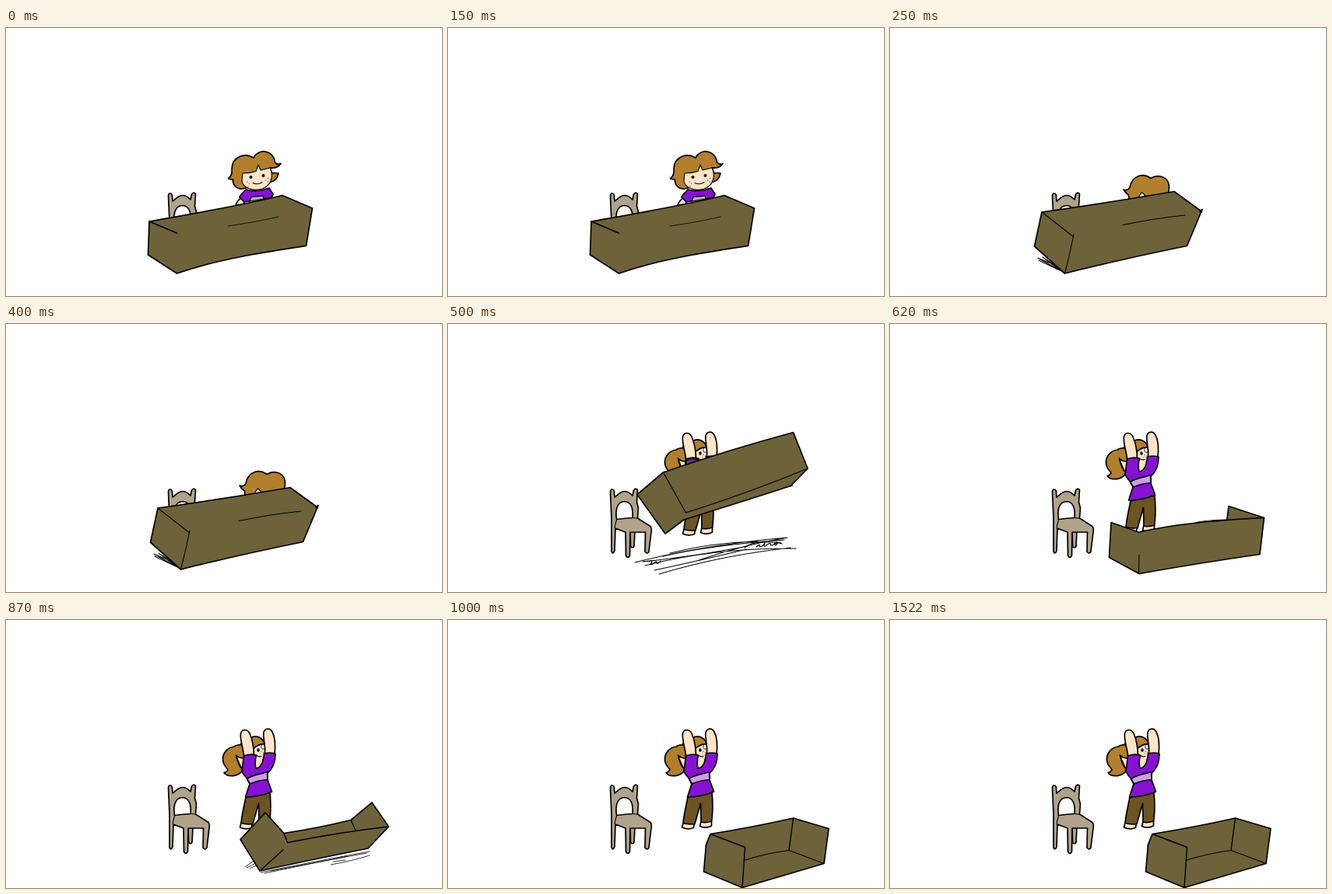
Animation of 560 by 345 pixels, one loop 1.87 s. Source, as an HTML page:

```html
<!DOCTYPE html>
<html lang="en">
<head>
<meta charset="utf-8">
<title>Flipping the desk</title>
<style>
html, body { margin: 0; width: 100%; height: 100%; overflow: hidden; background: #fff; }
svg { display: block; width: 100vw; height: 100vh; }
svg { fill: none; stroke: #000; stroke-width: 1.7; stroke-linecap: round; stroke-linejoin: round; }
.pose { visibility: hidden; }
.pose.on { visibility: visible; }
.wood { fill: #6e623b; }
.chair { fill: #b1a28b; }
.hair { fill: #b17f2d; }
.skin { fill: #fde4ca; }
.top { fill: #8512d0; }
.sash { fill: #cf9ceb; }
.pants { fill: #6c5423; }
.paper { fill: #fff; }
.thin { stroke-width: 1.1; }
.fine { stroke-width: .8; }
.dot { fill: #000; stroke: none; }
.freckle { fill: #6b4a30; stroke: none; }
</style>
</head>
<body>
<svg viewBox="0 0 560 345">
  <defs>
    <g id="chair">
      <path class="chair" d="M234 266 L234.500 286 Q237 290 239 286 L240 267Z"/>
      <path class="chair" d="M208.500 216 Q208.500 212.500 211.500 213 Q214 214 213.500 218 L214 223 C218 220 221 215.500 227 215.500 C232 215.500 234 218 237 221 L238.500 214 Q241 210.500 243.500 213.500 L242.500 229 L244.500 237 L243.500 250 L260 260.500 Q262 263 261 268 L258 293 Q256 297 253 293 L253.500 268 L234 268 L233.500 298 Q231 303 228.500 298 L228 268 L215 263 L214 292 Q212 297 210 293 L210 250Z"/>
      <path class="paper" d="M216.500 251.500 C215 241 216 228.500 227 228.500 C236 229 238 239 237 249.500 Q227 250 216.500 251.500Z"/>
      <path d="M214 262 L216.500 252 M237 249.500 L243.500 250" class="thin"/>
    </g>

    <g id="legs">
      <path class="skin" d="M302 261 L300.500 267 Q308 270.500 315.500 267.500 L316.500 261Z"/>
      <path class="skin" d="M325 259 L323.500 265.500 Q331 269 338.500 265 L338.500 258Z"/>
      <path class="pants" d="M308 228 L339 221 C340.500 238 340 250 338.500 259 Q331 261.500 325 260 L324.500 236 L317 262.500 Q309 263.500 302 261.500 C303 249 306 239 308 228Z"/>
    </g>

    <g id="girl">
      <path class="skin thin" d="M302 158 C313 148 328 150 332 161 C334 169 333 177 330 179 L330 190 L320 192 L304 194 L296 176Z"/>
      <path class="hair" d="M304 161 C298 160 294 162 293 163 C284 164 278 172 278.500 180 C279 188 285 191 285 193 Q283 196 280 196.500 C285 203 299 202 304 193 C299 188 297 181 295.500 174 Q299 178 306 178Z"/>
      <path class="hair" d="M314 152 C321 147 331 152 332 160 C325 159 321 163 317 166Z"/>
      <path class="skin" d="M306 177 C305 166 300 153 301.500 146 C303 140 310 140 313 146 C316 153 318.500 163 318.500 176Z"/>
      <path class="skin" d="M332 174 C334.500 164 329.500 151 331 144.500 C333 139 339 138.500 342 144 C346.500 152 346 164 345 174Z"/>
      <path class="top" d="M305.500 175 Q313 172 321.500 174 Q319 183 321 191 Q330 190 331.500 172 Q339 170 346 172 C346 182 343 191 336 197 L336 206 L341.500 221 Q325 228 307.500 228 L313 211 L309.500 204 Q305 199 303 195Z"/>
      <path class="sash" d="M309.500 204.500 C319 198 327 199 335.500 195.500 L336 205.500 C328 206 320 208 313.500 211Z"/>
      <path class="paper fine" d="M330 160 Q326 162 329 166 Q332 167 332 165"/>
      <ellipse class="dot" cx="324" cy="167.500" rx="1.700" ry="2.200"/>
      <path class="thin" d="M322 174.500 Q325 176.500 328 175.500"/>
      <g class="freckle"><circle cx="328" cy="169.500" r=".7"/><circle cx="330.500" cy="171" r=".7"/><circle cx="327" cy="172" r=".6"/></g>
    </g>
  </defs>

  <use href="#chair"/>

  <!-- sitting -->
  <g class="pose">
    <path class="skin" d="M303 218 Q297 222 295 228 L305 227 L308 219Z"/>
    <path class="hair" d="M318 167 C306 160 290 166 290 182 C291 189 288 192 285.500 194 Q289 195 291.500 195 C291 202 296 207.500 304 207 L341 198 Q348 196 350 187 Q346 186 342 187 L339 180 Q349 181 353 174.500 Q349 177 345.500 173 C343 156 324 155 318 167Z"/>
    <path class="skin thin" d="M304 187 Q313 187 321 184.500 L324 176 L327 183 L339 180 C344 190 341 203 329 207 C316 211 304 205 303 197Z"/>
    <path class="top" d="M308 208 C305 212 301 214 300 218 L306 224 L341 218 L343 214 L338 206 Q323 212 308 208Z"/>
    <path fill="#bda9c8" class="thin" d="M313 223 L315 217.500 Q323 217 330 216 L331 220Z"/>
    <circle class="dot" cx="314.500" cy="192" r="2"/><circle class="dot" cx="330.500" cy="190" r="2"/>
    <path class="thin" d="M317 199.500 Q323 202.500 329 198.500"/>
    <g class="freckle"><circle cx="310" cy="198" r=".7"/><circle cx="312.500" cy="200.500" r=".7"/><circle cx="311" cy="204" r=".7"/><circle cx="333.500" cy="196" r=".7"/><circle cx="336.500" cy="193.500" r=".7"/><circle cx="336.500" cy="198" r=".7"/></g>
    <path class="wood" d="M184 249 C240 239 300 229 355 215.500 L393.500 232 L385.500 280.500 C330 289 270 298 219.500 316 L182.500 292Z"/>
    <path d="M184 249 L219.500 264"/>
    <path class="fine" d="M285 255 Q320 250 350 243"/>
  </g>

  <!-- ducking behind -->
  <g class="pose">
    <path class="hair" d="M300 208 Q306 210 308 205 C311 190 325 186 335 193.500 C345 187 359 192 358.500 206 L357 218 L307 224 L306.500 215 Q303 213 300 208Z"/>
    <path class="skin thin" d="M319 218 L323.500 211.500 L329 217Z"/>
    <path class="thin" d="M190 296 L222 314 M191 299 L218 312 M196 295 L224 315 M192 297 L214 306 M201 298 L224 315 M195 301 L221 313 M205 302 L224 315"/>
    <path class="wood" d="M195 237 Q280 225 365 210.500 L400 236 L381.500 280.500 Q300 297 224.500 316 L185.500 281Z"/>
    <path class="thin" d="M195 237 L236 269 M236 266 Q231 291 224.500 316"/>
    <path d="M398 236 L401 233.500 L400 237"/>
    <path class="thin" d="M299 253.500 Q340 245 379 241"/>
  </g>

  <!-- heaving the desk up -->
  <g class="pose">
    <use href="#legs" x="1" y="3"/>
    <use href="#girl" y="-1"/>
    <path d="M306 176 Q313 172 321 175 L320 182 L305 186Z" fill="#5b348e" class="thin"/>
    <path class="wood" d="M243 219.500 L276.500 191 Q360 162 443.500 139.500 L462 186 L440 208.500 Q380 228 325 245 L303 252 L279 270Z"/>
    <path d="M276.500 191 L305.500 243 Q390 216 462 186" class="thin"/>
    <path d="M290 262 L302 252" class="thin"/>
    <path d="M438 209 L442 208"/>
    <path class="thin" d="M240 307 Q330 284 436 275 M253 311 Q340 288 447 289 M271 322 Q350 298 440 288 M276 299 Q335 285 432 278 M250 306 Q310 300 385 286 M285 295 Q340 281 398 280 M265 317 Q330 303 383 290 M322 304 Q380 284 436 275"/>
    <path class="thin" d="M258 306 q4 -3 4 1 q-5 4 1 2 q5 -5 5 -2 q0 4 5 -2 M381 288 Q388 281 405 281 Q420 280 429 283 M396 287 q6 -5 4 -1 q3 2 7 -4 q-3 6 2 3 q6 -5 5 -1 q3 2 5 -1 q5 -5 4 0 q-4 4 -3 0 q4 -3 8 -1"/>
  </g>

  <!-- desk turned over -->
  <g class="pose">
    <use href="#legs" x="1"/>
    <use href="#girl" x="-1" y="-1"/>
    <path class="wood" d="M435 234.500 L480.500 249.500 L474 270 L432 258Z"/>
    <path class="wood" d="M284 255.500 L319.500 268 Q355 260 394 256 Q438 251 480.500 249.500 L475 296.500 Q395 308 320 321.500 L281.500 300.500Z"/>
    <path class="thin" d="M320 297 L319.500 321 M393 255.500 Q410 252 432 252"/>
  </g>

  <!-- desk rolling -->
  <g class="pose">
    <use href="#legs"/>
    <use href="#girl"/>
    <path class="fine" d="M307 318 L317 311 M309 319 L319 314 M313 320 L321 316 M327 325 Q400 310 467 298 M332 326 L439 304 M340 323 L463 300 M417 315 Q445 310 467 303 M420 311 L436 309"/>
    <path class="wood" d="M301 282.500 L333 248 L357 274.500 Q400 268 443 257.500 L470 235 L491.500 266 L465 294 Q395 308 326 323Z"/>
    <path d="M357 274.500 L361.500 286.500 Q430 273 491.500 266" stroke-width="1.400"/>
    <path class="thin" d="M443 257.500 L449 271 M356.500 295.500 L326 323"/>
  </g>

  <!-- desk at rest -->
  <g class="pose">
    <use href="#legs"/>
    <use href="#girl"/>
    <path class="wood" d="M337 275.500 Q390 267 443.500 255 L489 268.500 L483 313.500 Q430 329 378 344.500 L328.500 324 L331.500 289Z"/>
    <path d="M337 275.500 L381.500 292.500 L378 344.500 M443.500 255 L438 296" stroke-width="1.400"/>
    <path class="thin" d="M380 309.500 Q410 300 438 296.500 L483 313.500 M331 291 L333 287"/>
  </g>
</svg>
<script>
const ends = [250, 500, 620, 870, 1000, 1870];
const loop = ends[ends.length - 1];
const poses = document.querySelectorAll('.pose');
const start = performance.now();

function draw() {
  const t = (performance.now() - start) % loop;
  const now = ends.findIndex(end => t < end);
  poses.forEach((pose, i) => pose.classList.toggle('on', i === now));
  requestAnimationFrame(draw);
}
draw();
</script>
</body>
</html>
```
